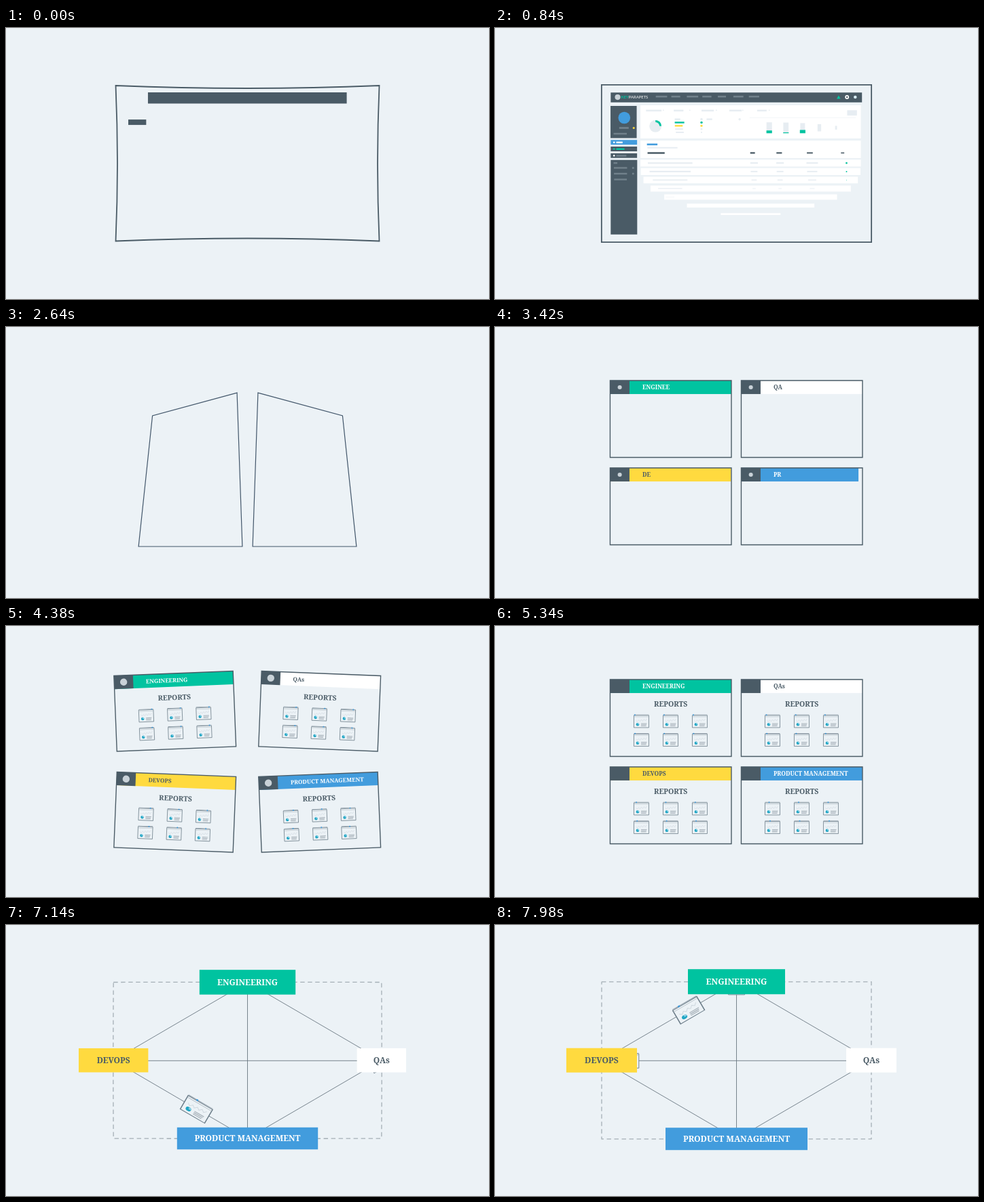
Recreate the animation shown at these times as an HTML page with a canvas. Size 711 by 400 pixels, loop 8 s.

```html
<!DOCTYPE html>
<html lang="en">
<head>
<meta charset="utf-8">
<title>Team reports</title>
<style>
html, body { margin: 0; width: 100%; height: 100%; overflow: hidden; background: #ecf2f6; }
canvas { display: block; width: 711px; height: 400px; }
</style>
</head>
<body>
<canvas id="stage"></canvas>
<script>
const LOOP = 8000, STEP = 60, CX = 355.5, CY = 200;
const BG = '#ecf2f6', INK = '#4a5b66', EDGE = '#42566a', GREEN = '#00c3a0', YELLOW = '#ffda3f',
  BLUE = '#429cdd', PALE = '#e7edf2', MUTED = '#71818b', WHITE = '#fff', MARK = '#c9d2d8';
const SERIF = '"Noto Serif", serif', SANS = 'Lato, sans-serif';

const canvas = document.getElementById('stage');
const dpr = window.devicePixelRatio || 1;
canvas.width = Math.round(711 * dpr);
canvas.height = Math.round(400 * dpr);
const c = canvas.getContext('2d');

const lerp = (a, b, p) => a + (b - a) * p;
const mix = (a, b, p) => a.map((v, i) => lerp(v, b[i], p));
const ramp = (t, a, b) => Math.min(1, Math.max(0, (t - a) / (b - a)));
const inOut = p => p < .5 ? 2 * p * p : 1 - 2 * (1 - p) ** 2;
const ease = (t, a, b) => inOut(ramp(t, a, b));
const out = (t, a, b) => 1 - (1 - ramp(t, a, b)) ** 3;
const arc = p => Math.sin(Math.PI * p);
const ring = (x, decay) => Math.exp(-decay * x) * Math.cos(Math.PI * x);
const noise = n => Math.abs(Math.sin(n * 12.9898) * 43758.5453) % 1;

function poly(points, fill, stroke, width = 1.3) {
  c.beginPath();
  points.forEach(([x, y]) => c.lineTo(x, y));
  c.closePath();
  if (fill) { c.fillStyle = fill; c.fill(); }
  if (stroke) { c.strokeStyle = stroke; c.lineWidth = width; c.stroke(); }
}

function rect(x, y, w, h, fill) {
  c.fillStyle = fill;
  c.fillRect(x, y, w, h);
}

function disc(x, y, r, fill, turn = 1) {
  c.beginPath();
  if (turn < 1) c.moveTo(x, y);
  c.arc(x, y, Math.max(0, r), -Math.PI / 2, (turn * 2 - .5) * Math.PI);
  c.fillStyle = fill;
  c.fill();
}

function text(str, x, y, size, fill, align = 'left', family = SERIF, weight = 700) {
  c.font = `${weight} ${size}px ${family}`;
  c.textAlign = align;
  c.fillStyle = fill;
  c.fillText(str, x, y);
}

/* ---------- dashboard ---------- */

function dashboard(t) {
  const bounce = ring(t / 300, 1.2);
  const rise = ease(t, 1020, 1680), leap = ease(t, 1740, 2460);
  const wide = lerp(lerp(198.5 - 4.5 * bounce, 214, rise), 289, leap);
  const narrow = lerp(lerp(198.5 - 4.5 * bounce, 204, rise), 242, leap);
  const top = lerp(lerp(84 + bounce, 53, rise), 43, leap) - 48 * arc(leap);
  const bottom = lerp(lerp(316 - 1.5 * bounce, 296.5, rise), 327, leap) + 86 * arc(leap);
  const bow = 4 * bounce - 3.5 * rise * (1 - leap);
  const size = (wide + narrow) / 418;

  // layout coordinates to stage, tapering towards the bottom
  const map = (x, y) => {
    const v = (y - 53) / 244;
    return [CX + rise * .4 + (x - 356) / 214 * lerp(wide, narrow, v), lerp(top, bottom, v)];
  };
  const shown = start => out(t, start, start + 300) * (1 - ease(t, 2080 + start / 8, 2280 + start / 8));
  const box = (x, y, w, h, fill, start, p = shown(start), q = p) => {
    if (p <= 0) return;
    const l = x + w * (1 - p) / 2, r = l + w * p, a = y + h * (1 - q) / 2, b = a + h * q;
    poly([map(l, a), map(r, a), map(r, b), map(l, b)], fill);
  };
  const dot = (x, y, r, fill, start, turn) => disc(...map(x, y), r * size * shown(start), fill, turn);
  const dashes = (x, y, n, pitch, w, fill, start) => {
    for (let i = 0; i < n; i++)
      box(x + i * pitch, y, w * (.7 + .6 * noise(i + x)), 2.7, fill, start + i * 30);
  };
  const columns = (y, w, fill, start) => {
    for (let n = 0; n < 4; n++)
      box(377.5 + 38 * n + 3.2 * n * n, y, w * (1 + n % 3 * .25), 2.6, fill, start + n * 30);
  };

  const [l, y0] = map(142, 53), [r] = map(570, 53), [l2, y1] = map(142, 297), [r2] = map(570, 297);
  c.beginPath();
  c.moveTo(l, y0);
  c.quadraticCurveTo(CX, y0 + 2 * bow, r, y0);
  c.quadraticCurveTo((r + r2) / 2 - 5 * bounce, (y0 + y1) / 2, r2, y1);
  c.quadraticCurveTo(CX, y1 - 8 * bounce, l2, y1);
  c.quadraticCurveTo((l + l2) / 2 + 5 * bounce, (y0 + y1) / 2, l, y0);
  c.closePath();
  c.strokeStyle = INK;
  c.lineWidth = 1.8;
  c.stroke();

  const open = out(t, 0, 360), stay = shown(-400);
  box(156.5, 64.8, 398.5, 15.2, INK, 0, lerp(.81, 1, open) * stay, lerp(1.15, 1, open) * stay);
  box(156.2, 85.5, 41.5, 50, INK, 0, lerp(.7, 1, open) * stay, lerp(.17, 1, open) * stay);

  dashes(228, 69.8, 7, 24.6, 15, MUTED, 260);
  const brand = shown(300), font = 6.2 * size * brand;
  if (brand > 0) {
    const [x, y] = map(173, 74);
    text('KEY', x, y, font, GREEN, 'left', SANS);
    text('PARAPETS', x + c.measureText('KEY').width, y, font, WHITE, 'left', SANS, 400);
    poly([map(518, 72 - 2.8 * brand), map(518 + 3 * brand, 74.5), map(518 - 3 * brand, 74.5)], GREEN);
  }
  dot(167.5, 72, 4.3, MARK, 280);
  dot(531.3, 72, 3.1, WHITE, 340);
  dot(531.3, 72, 1.3, INK, 340);
  dot(544.3, 72, 2.4, '#d8edf8', 370);

  dot(178, 104, 9.3, BLUE, 240);
  box(170, 118.3, 15, 3, MUTED, 300);
  dot(193, 119.8, 1.6, YELLOW, 330);
  box(161, 127.5, 21, 2.6, MUTED, 340);
  [WHITE, GREEN, MUTED].forEach((mark, i) => {
    const y = 138.5 + i * 10.3, start = 300 + i * 60;
    box(156.5, y, 41.8, 7.3, i ? INK : BLUE, start);
    dot(161.8, y + 3.7, 1.4, i === 1 ? GREEN : WHITE, start + 60);
    box(165.3, y + 2.5, 10 + 3 * i, 2.6, mark, start + 80);
  });
  box(156.5, 169.5, 42, 115.5, INK, 460);
  box(161, 173, 6, 2.5, MUTED, 540);
  for (let i = 0; i < 3; i++) {
    box(161.5, 180.5 + i * 9, 21, 2.6, MUTED, 560 + i * 40);
    if (i < 2) dot(192, 181.8 + i * 9, 1.6, MUTED, 600);
  }

  box(203.7, 84.5, 349.5, 51.5, WHITE, 380);
  dashes(212.5, 91.5, 5, 44, 20, PALE, 500);
  for (let i = 0; i < 5; i++) dot(240 + i * 42, 92.3, 1, PALE, 560);
  dot(227.5, 117, 9.5, PALE, 540);
  dot(227.5, 117, 9.5, GREEN, 620, .25);
  dot(227.5, 117, 6.2, PALE, 540);
  [PALE, GREEN, YELLOW, PALE, PALE].forEach((fill, i) => {
    const y = 105 + i * 5.1, start = 560 + i * 40;
    box(258, y, 8 + 13 * noise(i + 2), 2.6, fill, start);
    dot(300.5, y + 1.3, 1.9, fill, start + 40);
  });
  box(308.5, 105, 9, 2.6, PALE, 600);
  dot(361, 106.3, 1.9, PALE, 620);
  box(376, 104, 170, .5, PALE, 600);
  [5, 2, 14.5, 5, 15].forEach((h, i) => {
    const x = 403.5 + i * 26.5, start = 600 + i * 50, g = h * shown(start + 100);
    box(x, 111, 8.8, 17, PALE, start);
    box(x, 128 - g, 8.8, g, GREEN, start, 1);
  });
  box(531.5, 92.3, 15.5, 8.3, PALE, 560);

  box(203.7, 139.5, 349.5, 27, WHITE, 480);
  box(213.8, 144, 17, 2.8, BLUE, 620);
  box(213.8, 149.5, 49.5, 2.2, PALE, 640);
  box(214, 157.3, 29, 2.8, INK, 660);
  columns(157.3, 8, INK, 660);
  for (let i = 0; i < 9; i++) {
    const y = 169 + i * 13.2, start = 540 + i * 45;
    box(203.7, y, 349.5, 10.6, WHITE, start);
    box(214, y + 4, 73.5, 2.5, PALE, start + 100);
    for (let n = 0; n < 3; n++)
      box(377.5 + 38 * n + 3.2 * n * n, y + 4, n < 2 ? 12.8 : 19.5, 2.5, PALE, start + 120);
    dot(530.5, y + 5.3, 1.8, GREEN, start + 180);
  }
}

/* ---------- two doors ---------- */

function doors(t) {
  const swing = ring((t - 2460) / 180, .82) * (1 - ramp(t, 2700, 2960));
  const ahead = Math.max(0, swing), behind = Math.max(0, -swing);
  const top = 79 - 36 * ahead, bottom = 321.5 - 5.7 * swing;
  for (const s of [-1, 1]) {
    poly([
      [CX + s * (7.5 + 18 * behind), top + 41 * behind],
      [CX + s * (185.5 + 103.5 * swing), top + 118 * behind],
      [CX + s * (185.5 + 57 * swing), bottom],
      [CX + s * 7.6, bottom]
    ], null, EDGE, 1.2);
  }
}

/* ---------- report panels and labels ---------- */

const TEAMS = [
  { name: 'ENGINEERING', fill: GREEN, ink: WHITE, side: [0, -1], size: [143, 37] },
  { name: 'QAs', fill: WHITE, ink: INK, side: [1, 0], size: [74, 36] },
  { name: 'DEVOPS', fill: YELLOW, ink: INK, side: [-1, 0], size: [104, 36] },
  { name: 'PRODUCT MANAGEMENT', fill: BLUE, ink: WHITE, side: [0, 1], size: [209, 33] }
];
const W = 178.5, H = 113.5, HEAD = 20, BADGE = 28.5, INDENT = 47.5;
const home = i => [CX - .3 + (i % 2 ? 1 : -1) * 96.5, i > 1 ? 264.7 : 135.7];

function card(x, y, sx, sy, rotation, mark) {
  c.save();
  c.translate(x, y);
  c.rotate(rotation);
  c.scale(sx, sy);
  c.translate(-11, -9);
  poly([[0, 0], [22, 0], [22, 18], [0, 18]], BG, '#6b7c88', .8);
  rect(0, -1.2, 22, .6, '#8795a0');
  rect(0, 1.8, 22, .5, '#a9b4bc');
  disc(mark, -.6, 1, BLUE);
  c.beginPath();
  for (let i = 0; i < 9; i++) c.lineTo(3 + i * 2, 8.5 - i * .25 + (i % 2 ? 1.2 : -1.2));
  c.strokeStyle = '#cdd6dd';
  c.lineWidth = .6;
  c.stroke();
  disc(5.5, 13.3, 2.3, '#20a6c4');
  disc(5.5, 13.3, 2.3, '#8fd0e6', .25);
  for (let i = 0; i < 3; i++) rect(10.5, 11.6 + i * 1.7, 8.5 - i * .5, 1, '#a9b3bb');
  c.restore();
}

function panel(team, i, t) {
  const sx = i % 2 ? 1 : -1, sy = i > 1 ? 1 : -1, [x, y] = home(i);
  const spread = 1.2 * arc(ramp(t, 4080, 5040));
  const fold = ease(t, 5400, 5580), gone = 1 - ease(t, 5360, 5520);
  const head = out(t, 3080 + i * 50, 3360 + i * 50);

  c.save();
  c.translate(x + sx * 10 * spread, y + sy * 10 * spread);
  c.rotate(-sx * sy * spread * .04);
  c.scale(1 - .017 * spread, 1 - .017 * spread);
  c.translate(-W / 2, -H / 2);

  const joined = 7.75 * (1 - ease(t, 2940, 3120));
  const y0 = sy > 0 ? -joined : 0, y1 = lerp(H + (sy < 0 ? joined : 0), HEAD, fold);
  rect(0, 0, W * head, HEAD, team.fill);
  rect(0, 0, BADGE * Math.min(1, head * 2), HEAD, INK);
  poly([[0, y0], [W, y0], [W, y1], [0, y1]], null, INK, 1.4);

  disc(14.2, 10, 5.3 * out(t, 3360, 3600) * (1 - ease(t, 4800, 5040)), MARK);
  const typed = Math.ceil(team.name.length * ramp(t, 3240 + i * 50, 3540 + i * 50));
  text(team.name.slice(0, typed), INDENT, 13.3, 8.5, team.ink);

  const title = out(t, 3420, 3660) * gone;
  if (title > 0) text('REPORTS', W / 2, 39.8, 10.5 * title, INK, 'center');
  for (let n = 0; n < 6; n++) {
    const grow = out(t, 3540 + n * 60, 3780 + n * 60) * gone;
    const mark = 10.5 + 9 * Math.cos(Math.PI * (t - 4380) / 960 + i * .35 + n * .06);
    if (grow > 0) card(46 + n % 3 * 43, 62 + (n > 2) * 27.5, grow, grow, 0, mark);
  }
  c.restore();
}

// settled growth of the network, 0 to 1
const growth = t => ease(t, 6240, 7560);
const reach = t => [lerp(192.7, 198.5, growth(t)), lerp(112.5, 116, growth(t))];
const morph = t => ease(t, 5520, 5880);

function labelBox(team, i, t) {
  const [hw, hh] = reach(t), shrink = 1 - growth(t), [w, h] = team.size;
  const rest = [CX + team.side[0] * hw, CY - .3 + team.side[1] * hh, w - 8 * shrink, h - 2.4 * shrink];
  const [x, y] = home(i);
  return mix([x, y - (H - HEAD) / 2, W, HEAD], rest, morph(t));
}

function label(team, [x, y, w, h], t) {
  const m = morph(t);
  rect(x - w / 2, y - h / 2, w, h, team.fill);
  rect(x - w / 2, y - h / 2, BADGE * (1 - m), h, INK);
  const size = lerp(8.5, 12.2 * w / team.size[0], m);
  c.font = `700 ${size}px ${SERIF}`;
  const offset = (INDENT + c.measureText(team.name).width / 2 - W / 2) * (1 - m);
  text(team.name, x + offset, y + size * .36, size, team.ink, 'center');
}

/* ---------- network ---------- */

// each hop names the sending and receiving team; hops sharing a beat leave together
const BEATS = ['30', '01', '23', '13', '30 12', '02'].map(hops => hops.split(' '));

function sendCard([from, to], start, boxes, t) {
  const [ax, ay] = boxes[from], [bx, by] = boxes[to];
  const dx = bx - ax, dy = by - ay;
  const p = ease(t, start, start + 575 + .536 * Math.hypot(dx, dy));
  if (p <= 0 || p >= 1) return;
  const diagonal = Math.abs(dx) > 5 && Math.abs(dy) > 5, lift = arc(p);
  card(ax + dx * p, ay + dy * p + 1, 1.05 + lift * (diagonal ? .9 : .4), 1.1 + lift * .2,
    diagonal ? Math.atan(dy / dx) : 0, 3 + 8 * p);
}

function web(t) {
  const [hw, hh] = reach(t), grow = out(t, 5640, 5940);
  const bow = t < 6240 ? ease(t, 5880, 6240) : ring((t - 6240) / 300, 1.2);
  c.save();
  c.translate(CX, CY - .2);
  c.scale(grow, grow);
  c.beginPath();
  c.moveTo(-hw, -hh);
  c.quadraticCurveTo(0, -hh + 16 * bow, hw, -hh);
  c.quadraticCurveTo(hw - 25 * bow, 0, hw, hh);
  c.quadraticCurveTo(0, hh - 16 * bow, -hw, hh);
  c.quadraticCurveTo(-hw + 25 * bow, 0, -hw, -hh);
  c.setLineDash([6.5, 4.5]);
  c.strokeStyle = '#a5afb6';
  c.lineWidth = 1.3;
  c.stroke();
  c.setLineDash([]);

  c.beginPath();
  for (const x of [-1, 1]) for (const y of [-1, 1]) {
    c.moveTo(0, y * hh);
    c.quadraticCurveTo(x * (hw / 2 - 4 * bow), y * (hh / 2 - 6 * bow), x * hw, 0);
  }
  c.moveTo(0, -hh);
  c.lineTo(0, hh);
  c.moveTo(-hw, .5);
  c.lineTo(hw, .5);
  c.strokeStyle = '#6a7882';
  c.lineWidth = .9;
  c.stroke();
  c.restore();
}

function network(t) {
  const boxes = TEAMS.map((team, i) => labelBox(team, i, t));
  web(t);
  BEATS.forEach((hops, n) => hops.forEach(hop => sendCard(hop, 6121 + 313 * n, boxes, t)));
  TEAMS.forEach((team, i) => label(team, boxes[i], t));
}

function draw(t) {
  c.setTransform(dpr, 0, 0, dpr, 0, 0);
  rect(0, 0, 711, 400, BG);
  if (t < 2460) dashboard(t);
  else if (t < 2940) doors(t);
  else if (t < 5580) TEAMS.forEach((team, i) => panel(team, i, t));
  else network(t);
}

const origin = performance.now();
function tick() {
  const t = (performance.now() - origin) % LOOP;
  draw(Math.floor(t / STEP) * STEP);
  requestAnimationFrame(tick);
}
tick();
</script>
</body>
</html>
```
